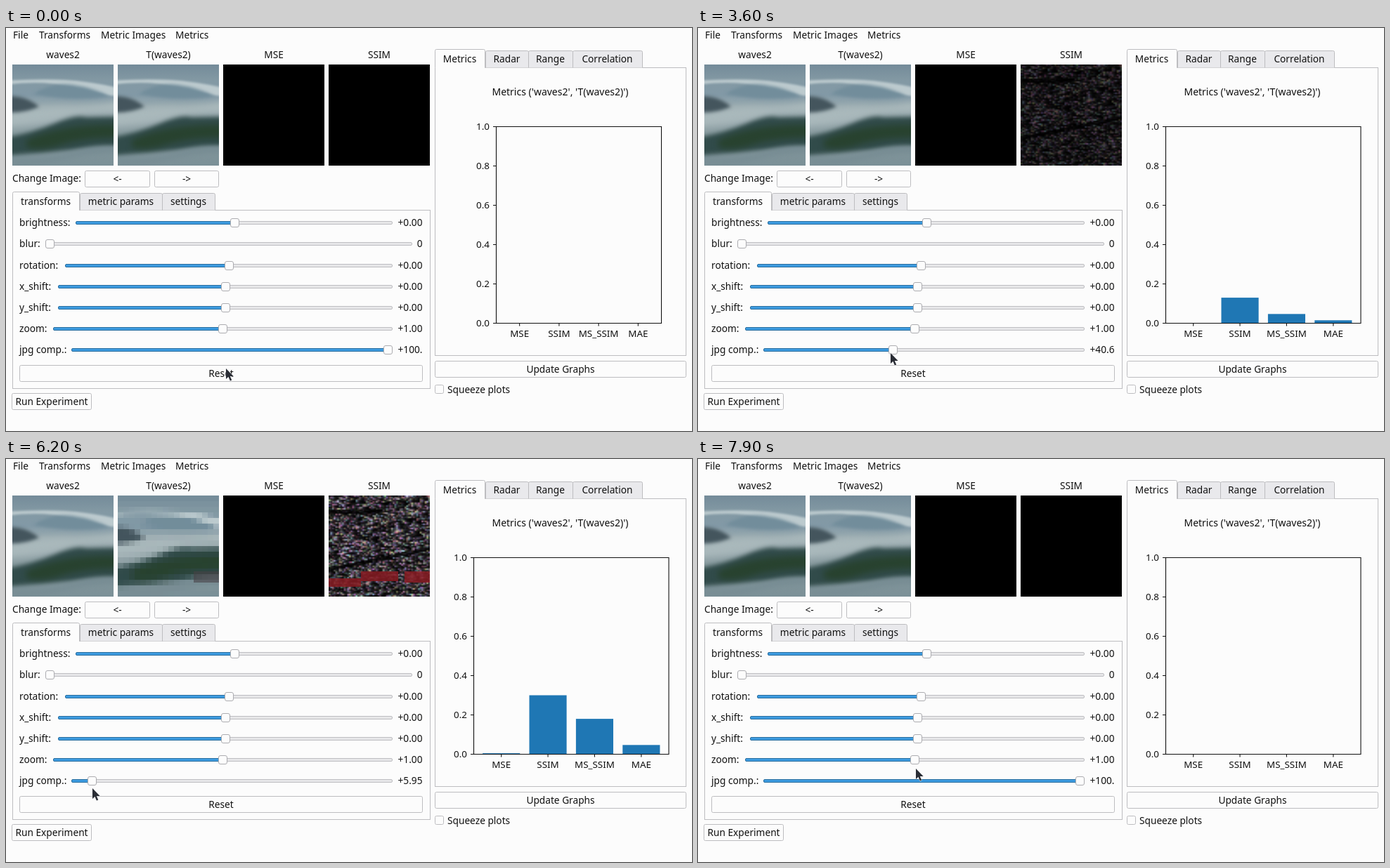
An HTML page with a canvas for the animation above (8 s loop, 976 by 574 pixels).

```html
<!DOCTYPE html>
<html lang="en">
<head>
<meta charset="utf-8">
<title>Image metrics</title>
<style>
html, body { margin: 0; width: 100%; height: 100%; overflow: hidden; background: #fcfcfc; }
svg { position: absolute; left: 0; top: 0; }
canvas { position: absolute; left: 9px; top: 52px; }
text { font: 13.7px "Noto Sans", "Open Sans", sans-serif; fill: #111; white-space: pre; }
#plot text { font-size: 13.4px; }
#plot .title { font-size: 14px; }
</style>
</head>
<body>
<svg id="stage" width="976" height="574" viewBox="0 0 976 574">
  <g id="ui"></g>
  <g id="plot"></g>
  <g id="jpg"></g>
  <path id="cursor" d="M0 0V15L3.4 11.8 5.9 17.6 8.2 16.6 5.8 10.9H10.6Z" fill="#2a2d35" stroke="#f4f4f6" paint-order="stroke"/>
</svg>
<canvas id="images" width="594" height="144"></canvas>
<script>
const LOOP = 8000, STEP = 100, SIZE = 144;
const $ = id => document.getElementById(id);

// [time, x, y]
const cursorKeys = [
  [0, 313, 485], [800, 541, 449], [900, 541, 449], [1000, 545, 456], [1300, 545, 456],
  [1600, 531, 457], [2200, 446, 458], [3100, 264, 460], [3600, 274, 463], [4600, 128, 470],
  [4900, 139, 470], [5200, 122, 470], [6100, 121, 470], [6200, 123, 469], [6900, 281, 463],
  [7000, 284, 464], [7400, 313, 485], [7500, 313, 485], [7900, 310, 441]
];
// [time, slider position 0..100]
const sliderKeys = [
  [0, 100], [1300, 100], [1600, 95], [2200, 77], [3100, 38], [3600, 40], [4600, 8], [4700, 8],
  [4900, 10], [5200, 4], [6100, 4], [6200, 5], [6900, 40], [7500, 40], [7600, 100]
];
// [slider position, MSE, SSIM, MS_SSIM, MAE]
const metricKeys = [
  [0, .012, .42, .3, .08], [4, .006, .325, .205, .053], [5, .005, .3, .18, .047],
  [10, .001, .23, .112, .03], [40, 0, .13, .047, .015], [77, 0, .06, .018, .008],
  [95, 0, .002, 0, .001], [100, 0, 0, 0, 0]
];

function at(keys, t) {
  const i = keys.findIndex(k => k[0] > t);
  if (i < 0) return keys[keys.length - 1].slice(1);
  const a = keys[i - 1], b = keys[i], f = (t - a[0]) / (b[0] - a[0]);
  return a.slice(1).map((v, j) => v + (b[j + 1] - v) * f);
}

function random(seed) {
  return () => (seed = (seed * 16807) % 2147483647) / 2147483647;
}

const text = (x, y, s, anchor = 'start', cls = '') =>
  `<text class="${cls}" x="${x}" y="${y}" text-anchor="${anchor}">${s}</text>`;
const box = (x, y, w, h, fill = '#fcfcfc', stroke = '#bdbdc0', r = 2) =>
  `<rect x="${x + .5}" y="${y + .5}" width="${w}" height="${h}" rx="${r}" fill="${fill}" stroke="${stroke}"/>`;
const button = (x, y, w, h, s) => box(x, y, w, h) + text(x + w / 2 + .5, y + 17, s, 'middle');

function tab(x0, x1, top, bottom, s, active) {
  const y = active ? top - 1 : top + 1;
  const d = `M${x0 + .5} ${bottom + .5}V${y + 2.5}q0-2 2-2H${x1 - 1.5}q2 0 2 2V${bottom + .5}`;
  return `<path d="${d}" fill="${active ? '#fcfcfc' : '#e9e9ec'}" stroke="#bdbdc0"/>` +
    (active ? `<path d="M${x0 + 1} ${bottom + .5}H${x1}" stroke="#fcfcfc" stroke-width="1.5"/>` : '') +
    text((x0 + x1) / 2, bottom - 7 + (active ? -.5 : 0), s, 'middle');
}

function slider(label, y, x0, x1, handle, value) {
  const groove = (end, fill, edge) => box(x0, y - 2, end - x0, 4, fill, edge, 1.5);
  return text(19, y + 5, label) + groove(x1, '#e7e7e9', '#bebec2') +
    (handle - x0 > 8 ? groove(handle, '#3d9be0', '#2b6f9f') : '') +
    box(handle - 6, y - 6, 12, 12, '#fcfcfc', '#acacb0', 2.5) +
    text(592.5, y + 5, value, 'end');
}

function drawUi() {
  const menu = [['File', 10], ['Transforms', 47], ['Metric Images', 135], ['Metrics', 241]];
  const titles = ['waves2', 'T(waves2)', 'MSE', 'SSIM'];
  $('ui').innerHTML =
    '<rect width="976" height="574" fill="#fcfcfc"/>' +
    menu.map(([s, x]) => text(x, 15, s)).join('') +
    titles.map((s, i) => text(81 + 150 * i, 43, s, 'middle')).join('') +
    text(9, 219, 'Change Image:') +
    button(112, 203, 92, 23, '&lt;-') + button(211, 203, 91, 23, '-&gt;') +
    box(9, 259, 594, 254, '#fcfcfc', '#bdbdc0', 0) +
    tab(105, 222, 234, 259, 'metric params') + tab(222, 297, 234, 259, 'settings') +
    tab(9, 104, 234, 259, 'transforms', true) +
    slider('brightness:', 277, 99, 549, 325, '+0.00') +
    slider('blur:', 307, 56, 577, 62, '0') +
    slider('rotation:', 338, 84, 549, 317, '+0.00') +
    slider('x_shift:', 368, 74, 549, 312, '+0.00') +
    slider('y_shift:', 398, 74, 549, 312, '+0.00') +
    slider('zoom:', 428, 67, 549, 308, '+1.00') +
    button(19, 480, 573, 23, 'Reset') + button(8, 520, 113, 23, 'Run Experiment') +
    box(610, 56, 357, 410, '#fcfcfc', '#bdbdc0', 0) +
    tab(682, 743, 31, 56, 'Radar') + tab(743, 806, 31, 56, 'Range') +
    tab(806, 905, 31, 56, 'Correlation') + tab(610, 681, 31, 56, 'Metrics', true) +
    button(610, 474, 357, 23, 'Update Graphs') +
    box(610, 508, 12, 12) + text(628, 520, 'Squeeze plots');
}

function drawPlot(narrow, values) {
  const [x0, x1] = narrow ? [697.5, 932.5] : [665.5, 943];
  const unit = (x1 - x0) / 4.18, top = 140.5, bottom = 420.5, h = bottom - top;
  let out = text(788.5, 96, "Metrics ('waves2', 'T(waves2)')", 'middle', 'title');
  let ticks = '';
  ['MSE', 'SSIM', 'MS_SSIM', 'MAE'].forEach((s, i) => {
    const x = x0 + (.59 + i) * unit, bar = values[i] * h;
    out += `<rect x="${x - .4 * unit}" y="${bottom - bar}" width="${.8 * unit}" height="${bar}" fill="#1f77b4"/>`;
    out += text(x, 440, s, 'middle');
    ticks += `M${x} ${bottom}v4`;
  });
  for (let i = 0; i <= 5; i++) {
    const y = bottom - h * i / 5;
    out += text(x0 - 9.5, y + 4.8, (i / 5).toFixed(1), 'end');
    ticks += `M${x0} ${y}h-4.5`;
  }
  $('plot').innerHTML = out +
    `<path d="M${x0} ${top}H${x1}V${bottom}H${x0}Z${ticks}" fill="none" stroke="#111" stroke-width="1.1"/>`;
}

const ctx = $('images').getContext('2d');

function makeCanvas(w, h = w) {
  const c = document.createElement('canvas');
  c.width = w;
  c.height = h;
  return c;
}

// Soft stand-in for the sea photograph.
function makePhoto() {
  const c = makeCanvas(SIZE), g = c.getContext('2d');
  const sea = g.createLinearGradient(0, 0, 0, SIZE);
  [[0, '#748b99'], [.16, '#8399a4'], [.3, '#8299a6'], [.42, '#9aabb0'], [.55, '#9dadb2'], [.7, '#879a9e'], [1, '#7b9097']]
    .forEach(([p, col]) => sea.addColorStop(p, col));
  g.fillStyle = sea;
  g.fillRect(0, 0, SIZE, SIZE);
  const shape = (d, col, blur) => {
    g.filter = `blur(${blur}px)`;
    g.fillStyle = col;
    g.fill(new Path2D(d));
  };
  shape('M-9 23Q40 20 75 22T155 34V46Q115 42 80 32T-9 29Z', '#bccace', 1.5);
  shape('M30 42Q55 25 85 29T138 45Q90 54 30 42Z', '#728d9b', 2);
  shape('M-9 68Q50 58 80 60T155 52V68Q110 66 80 74T-9 88Z', '#a9b8bb', 4);
  shape('M-9 45Q20 44 38 60Q15 70-9 68Z', '#44555d', 2.5);
  shape('M-9 104Q30 97 60 84T105 75L155 74V116Q110 120 80 122T-9 130Z', '#314b4a', 3);
  shape('M20 108Q70 84 155 86V104Q100 104 70 114T20 118Z', '#28422f', 4);
  shape('M-9 133Q50 136 85 124T155 118V126Q100 128 60 140T-9 142Z', '#788d94', 3);
  return c;
}

// Speckle brightness per channel, drawn out sideways.
function makeNoise(w, h) {
  const rnd = random(4217), cells = [];
  let last = 0;
  for (let y = 0; y < h; y++) {
    for (let x = 0; x < w; x++) {
      const streak = (Math.abs(y - 11) < 2 && x < 32) || Math.abs(y - 52 + x * .25) < 1.5;
      last = .35 * last + .65 * rnd() ** 3;
      const light = last * (streak ? .25 : 1);
      cells.push([1, .92, 1.02].map(b => light * (b - .3 + .6 * rnd())));
    }
  }
  return cells;
}

const photo = makePhoto();
const blocks = makeCanvas(18);
blocks.getContext('2d').drawImage(photo, 0, 0, 18, 18);
const speckle = makeCanvas(60, 72);
const noise = makeNoise(60, 72);

function drawSpeckle(gain) {
  const g = speckle.getContext('2d'), pixels = g.createImageData(60, 72);
  noise.forEach((rgb, i) => pixels.data.set([...rgb.map(v => v * gain), 255], i * 4));
  g.putImageData(pixels, 0, 0);
  ctx.imageSmoothingEnabled = true;
  ctx.drawImage(speckle, 450, 0, SIZE, SIZE);
}

function drawImages(k, ssim) {
  ctx.clearRect(0, 0, 594, SIZE);
  ctx.drawImage(photo, 0, 0);
  ctx.drawImage(photo, 150, 0);
  ctx.imageSmoothingEnabled = false;
  ctx.globalAlpha = Math.max(0, Math.min(.85, (13 - k) / 9));
  ctx.drawImage(blocks, 150, 0, SIZE, SIZE);
  ctx.globalAlpha = 1;
  ctx.fillStyle = '#000';
  ctx.fillRect(300, 0, SIZE, SIZE);
  drawSpeckle(100 * ssim / .13);
  if (k < 7) {
    ctx.fillStyle = 'rgba(72,66,70,.6)';
    ctx.fillRect(258, 108, 36, 16);
    ctx.fillStyle = 'rgba(135,26,34,.85)';
    ctx.fillRect(450, 118, 46, 12);
    ctx.fillRect(496, 108, 53, 14);
    ctx.fillRect(558, 108, 36, 16);
  }
}

let shownState = '';

function draw(t) {
  const [x, y] = at(cursorKeys, t);
  $('cursor').setAttribute('transform', `translate(${x} ${y})`);
  const k = Math.round(at(sliderKeys, t)[0]), narrow = t < 1400;
  const state = k + ' ' + narrow;
  if (state === shownState) return;
  shownState = state;
  const values = at(metricKeys, k);
  const label = '+' + (1 + .99 * k).toFixed(2);
  $('jpg').innerHTML = slider('jpg comp.:', 458, 93, 549, Math.round(99.5 + 4.435 * k), label.slice(0, 5));
  drawPlot(narrow, values);
  drawImages(k, values[1]);
}

const start = performance.now();

function tick() {
  const t = (performance.now() - start) % LOOP;
  draw(Math.floor(t / STEP) * STEP);
  requestAnimationFrame(tick);
}

drawUi();
tick();
</script>
</body>
</html>
```
